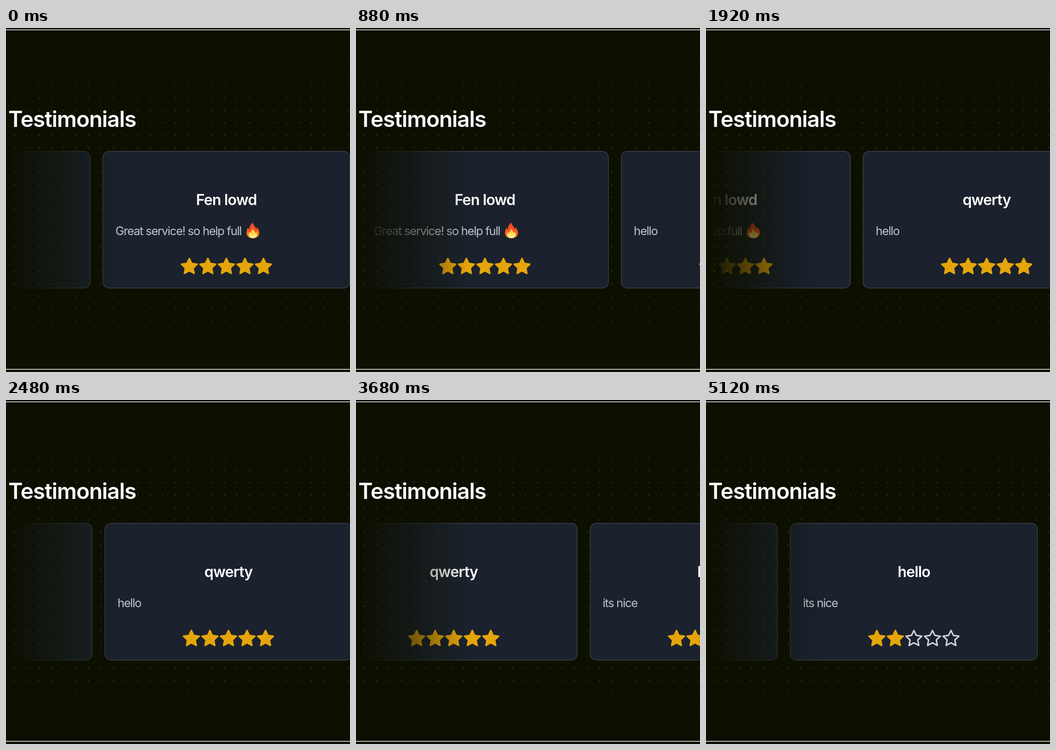
Write an HTML page that moves like this. It is 744 px wide and 744 px high and loops after 5200 ms.

```html
<!DOCTYPE html>
<html lang="en">
<head>
<meta charset="utf-8">
<title>Testimonials</title>
<style>
  html, body { margin: 0; height: 100%; overflow: hidden; background: #0d1000; }
  svg { display: block; width: 100vw; height: 100vh; }
  text { font-family: Inter, "Open Sans", sans-serif; font-optical-sizing: none; }
  .title { font-size: 47.5px; font-weight: 600; letter-spacing: -1.15px; fill: #fff; }
  .name { font-size: 32px; font-weight: 600; letter-spacing: -.85px; fill: #fff; text-anchor: middle; }
  .quote { font-size: 25.5px; letter-spacing: -1.3px; fill: #c1c4ca; }
  .box { fill: #1b222d; stroke: #39444d; stroke-width: 1.4px; }
  .star { fill: none; stroke: #cdd1d8; stroke-width: 3.2px; stroke-linejoin: round; }
  .star.on { fill: #e5a50a; stroke: #e5a50a; }
</style>
</head>
<body>
<svg viewBox="0 0 744 744">
  <defs>
    <pattern id="dots" x="4.62" y="4.75" width="26.76" height="26.76" patternUnits="userSpaceOnUse">
      <circle cx="13.38" cy="13.38" r="1.45" fill="#fff" fill-opacity=".14"/>
    </pattern>
    <linearGradient id="dotFade" x1="0" y1="0" x2="0" y2="1">
      <stop offset=".02" stop-color="#fff" stop-opacity="0"/>
      <stop offset=".2" stop-color="#fff"/>
      <stop offset=".8" stop-color="#fff"/>
      <stop offset=".98" stop-color="#fff" stop-opacity="0"/>
    </linearGradient>
    <linearGradient id="edgeFade" gradientUnits="userSpaceOnUse" x1="8" y1="0" x2="243" y2="0">
      <stop offset="0" stop-color="#fff" stop-opacity="0"/>
      <stop offset="1" stop-color="#fff"/>
    </linearGradient>
    <linearGradient id="flameOuter" x1="0" y1="0" x2="0" y2="1">
      <stop offset="0" stop-color="#e8452c"/>
      <stop offset=".55" stop-color="#f8591f"/>
      <stop offset="1" stop-color="#ffa02b"/>
    </linearGradient>
    <linearGradient id="flameInner" x1="0" y1="0" x2="0" y2="1">
      <stop offset="0" stop-color="#ffb52e"/>
      <stop offset=".6" stop-color="#ffdf5e"/>
      <stop offset="1" stop-color="#fff3b0"/>
    </linearGradient>
    <mask id="dotMask" maskUnits="userSpaceOnUse" x="0" y="0" width="744" height="744">
      <rect width="744" height="744" fill="url(#dotFade)"/>
    </mask>
    <mask id="edgeMask" maskUnits="userSpaceOnUse" x="0" y="0" width="744" height="744">
      <rect width="744" height="744" fill="url(#edgeFade)"/>
    </mask>
    <g id="flame">
      <path fill="url(#flameOuter)" d="M14 0C15 6 20 8 21 14C22 13 22.5 11.5 22 9.5C26 13 28 18 28 22C28 29 22 34 14 34C6 34 0 29 0 22C0 17 2 13 3.5 10C4 12 4.5 13.5 6 15C6.5 8 9 3 14 0Z"/>
      <path fill="url(#flameInner)" d="M14.5 13C15 18 19 19 19.5 23C20.5 22 21 21 21 19.5C23 22 23.5 24 23 26.5C22 31 18.5 33 14 33C9 33 5 30 5 25.5C5 23 6 21 7 19.5C7.5 21 8 22 9.5 23C10 19 11.5 16 14.5 13Z"/>
    </g>
  </defs>

  <rect width="744" height="744" fill="#0d1000"/>
  <rect width="744" height="744" fill="url(#dots)" mask="url(#dotMask)"/>
  <path d="M0 4H744M0 738.3H744" stroke="#f2f2ee" stroke-width="1.5"/>
  <text class="title" x="5" y="214">Testimonials</text>
  <g mask="url(#edgeMask)"><g id="track"></g></g>
</svg>
<script>
  const LOOP = 5200, STEP = 80, SPEED = 0.2248;
  const START = 209.5, PITCH = 562, CARD_WIDTH = 534.3, CENTER = CARD_WIDTH / 2;

  const reviews = [
    { name: "Fen lowd", quote: "Great service! so help full", stars: 5, flame: true },
    { name: "qwerty", quote: "hello", stars: 5 },
    { name: "hello", quote: "its nice", stars: 2 },
  ];

  const starPoints = (cx, cy) => Array.from({ length: 10 }, (_, i) => {
    const radius = i % 2 ? 8.8 : 17.9, angle = (i / 5 - 0.5) * Math.PI;
    return [cx + radius * Math.cos(angle), cy + radius * Math.sin(angle)].map(v => v.toFixed(2));
  }).join(" ");

  const star = (i, rating) =>
    `<polygon class="star ${i < rating ? "on" : ""}" points="${starPoints(CENTER + (i - 2) * 40.1, 516.3)}"/>`;

  const card = (review, slot) => `
    <g transform="translate(${slot * PITCH})">
      <rect class="box" y="266.7" width="${CARD_WIDTH}" height="295.8" rx="13.5"/>
      <text class="name" x="${CENTER}" y="383.3">${review.name}</text>
      <text class="quote" x="27.2" y="448">${review.quote}</text>
      ${review.flame ? '<use href="#flame" x="310.5" y="421"/>' : ""}
      ${[0, 1, 2, 3, 4].map(i => star(i, review.stars)).join("")}
    </g>`;

  // The last review also stands before the first one.
  const track = document.getElementById("track");
  track.innerHTML = [reviews[2], ...reviews].map((review, i) => card(review, i - 1)).join("");

  function draw() {
    const time = Math.floor(performance.now() % LOOP / STEP) * STEP;
    track.setAttribute("transform", `translate(${START - time * SPEED})`);
    requestAnimationFrame(draw);
  }
  draw();
</script>
</body>
</html>
```
